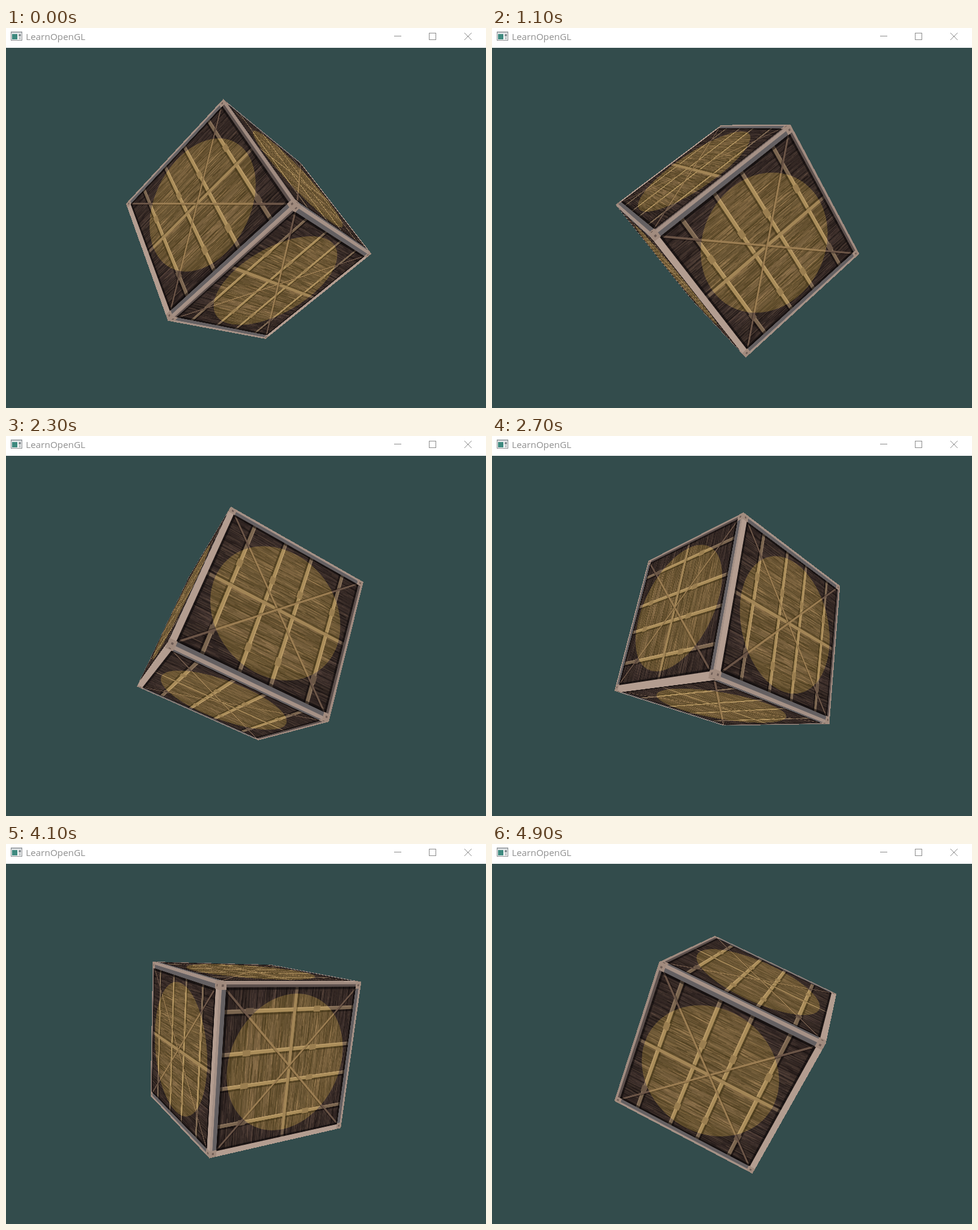
These frames come from a looping animation (799x633 px, 5 s). An HTML page with a canvas:

```html
<!DOCTYPE html>
<html lang="en">
<head>
<meta charset="utf-8">
<title>LearnOpenGL</title>
<style>
  html, body { margin: 0; width: 100%; height: 100%; overflow: hidden; background: #334c4c; }
  #bar { position: absolute; left: 0; top: 0; width: 799px; height: 33px; background: #fff; }
  #bar text { font: 15.3px "Open Sans", "Noto Sans", sans-serif; fill: #8f8f8f; }
  #view { position: absolute; left: 180px; top: 108px; }
</style>
</head>
<body>
<svg id="bar" viewBox="0 0 799 33">
  <rect x="8.5" y="6.5" width="18" height="14" fill="#fff" stroke="#85898c"/>
  <rect x="9" y="7" width="17" height="2" fill="#c9ced2"/>
  <rect x="10" y="10" width="9" height="9" fill="#3f8a80"/>
  <rect x="21" y="10" width="4" height="4" fill="#8a9296"/>
  <rect x="21" y="15" width="4" height="4" fill="#c3c8ca"/>
  <text x="33" y="20">LearnOpenGL</text>
  <g fill="none" stroke="#8c8c8c">
    <path d="M646 13.5h12"/>
    <rect x="704.5" y="8.5" width="11" height="11"/>
    <path d="M763 8l12 12M775 8l-12 12"/>
  </g>
</svg>
<canvas id="view" width="440" height="450"></canvas>
<script>
const LOOP = 5000, STEP = 100;
const START_DEG = -221.25, STEP_DEG = 6.25;
const FOCAL = 300 / Math.tan(Math.PI / 8), EYE = 3;
const LEFT = 180, TOP = 108, CX = 399.5, CY = 333.4;
const SIZE = 512;

function seeded(seed) {
  return () => {
    seed = (seed * 1664525 + 1013904223) >>> 0;
    return seed / 4294967296;
  };
}

// Dark crate side: planks, braces, bars, frame, and a faint yellow disc.
function makeTexture() {
  const cv = document.createElement('canvas');
  cv.width = cv.height = SIZE;
  const g = cv.getContext('2d', { willReadFrequently: true });
  const rnd = seeded(11);
  const box = (x, y, w, h, color) => {
    g.fillStyle = color;
    g.fillRect(x * SIZE, y * SIZE, w * SIZE, h * SIZE);
  };
  const line = (x1, y1, x2, y2, width, color) => {
    g.strokeStyle = color;
    g.lineWidth = width;
    g.beginPath();
    g.moveTo(x1 * SIZE, y1 * SIZE);
    g.lineTo(x2 * SIZE, y2 * SIZE);
    g.stroke();
  };

  box(0, 0, 1, 1, '#211a18');
  const planks = 21;
  for (let i = 0; i < planks; i++) {
    const k = 0.85 + rnd() * 0.35;
    box(i / planks, 0, 1 / planks - 0.004, 1, `rgb(${64 * k},${50 * k},${45 * k})`);
  }
  for (let i = 0; i < 2200; i++) {
    const color = rnd() < 0.48 ? 'rgba(168,136,112,.2)' : 'rgba(10,5,5,.24)';
    box(rnd(), rnd() * 1.1 - 0.1, 0.002 + rnd() * 0.004, 0.03 + rnd() * 0.15, color);
  }
  const shade = g.createRadialGradient(256, 256, 150, 256, 256, 360);
  shade.addColorStop(0, 'rgba(24,17,17,0)');
  shade.addColorStop(1, 'rgba(24,17,17,.55)');
  g.fillStyle = shade;
  g.fillRect(0, 0, SIZE, SIZE);

  for (const y of [0.16, 0.396, 0.59, 0.815]) {
    box(0.03, y + 0.01, 0.94, 0.013, 'rgba(10,6,6,.5)');
    box(0.03, y - 0.012, 0.94, 0.023, '#7a654f');
    box(0.03, y - 0.012, 0.94, 0.006, '#8d765f');
    for (const x of [0.17, 0.64]) box(x, y - 0.018, 0.05, 0.036, '#6a5645');
  }
  box(0.511, 0.03, 0.008, 0.94, 'rgba(10,6,6,.45)');
  box(0.489, 0.03, 0.022, 0.94, '#725d4b');
  for (const [a, b] of [[0.03, 0.97], [0.97, 0.03]]) {
    line(a, 0.035, b, 0.975, 8, 'rgba(15,9,8,.4)');
    line(a, 0.03, b, 0.97, 6, '#6b5547');
  }

  // Frame: dark inner lines, grey posts, then pale outer edges.
  box(0.04, 0, 0.016, 1, 'rgba(8,6,8,.55)');
  box(0.944, 0, 0.016, 1, 'rgba(8,6,8,.55)');
  box(0, 0.03, 1, 0.014, 'rgba(8,6,8,.55)');
  box(0, 0.95, 1, 0.014, 'rgba(8,6,8,.55)');
  box(0.015, 0, 0.026, 1, '#646062');
  box(0.959, 0, 0.026, 1, '#646062');
  box(0, 0.014, 1, 0.016, '#5c504d');
  box(0, 0, 0.016, 1, '#a59186');
  box(0.984, 0, 0.016, 1, '#a59186');
  box(0, 0, 1, 0.015, '#a08b80');
  box(0, 0.964, 1, 0.036, '#b39d90');
  for (const x of [0, 0.957]) {
    for (const y of [0, 0.957]) {
      box(x, y, 0.043, 0.043, '#a18b7e');
      box(x + 0.015, y + 0.015, 0.012, 0.012, '#6d5c55');
    }
  }

  g.globalCompositeOperation = 'lighter';
  g.fillStyle = '#30280b';
  g.beginPath();
  g.arc(SIZE / 2, SIZE * 0.491, SIZE * 0.423, 0, Math.PI * 2);
  g.fill();
  return g.getImageData(0, 0, SIZE, SIZE).data;
}

const tex = makeTexture();
const ctx = document.getElementById('view').getContext('2d');
const { width: W, height: H } = ctx.canvas;
const img = ctx.createImageData(W, H);
const clamp = v => Math.max(0, Math.min(SIZE - 1.001, v));

// Bilinear lookup; v points upwards.
function sample(u, v, out, o) {
  const x = clamp(u * SIZE - 0.5), y = clamp((1 - v) * SIZE - 0.5);
  const xi = x | 0, yi = y | 0, fx = x - xi, fy = y - yi;
  const p = (yi * SIZE + xi) * 4, q = p + SIZE * 4;
  for (let c = 0; c < 3; c++) {
    const a = tex[p + c] + (tex[p + c + 4] - tex[p + c]) * fx;
    const b = tex[q + c] + (tex[q + c + 4] - tex[q + c]) * fx;
    out[o + c] = a + (b - a) * fy;
  }
  out[o + 3] = 255;
}

// Casts one ray per pixel into the unit cube, turned about (0.5, 1, 0).
function drawCube(deg) {
  const t = deg * Math.PI / 180, c = Math.cos(t), s = Math.sin(t), n = 1 - c;
  const kx = 1 / Math.sqrt(5), ky = 2 * kx;
  const toModel = (x, y, z) => [
    x * (c + kx * kx * n) + y * kx * ky * n - z * ky * s,
    x * kx * ky * n + y * (c + ky * ky * n) + z * kx * s,
    x * ky * s - y * kx * s + z * c
  ];
  const eye = toModel(0, 0, EYE);
  img.data.fill(0);
  for (let j = 0; j < H; j++) {
    for (let i = 0; i < W; i++) {
      const d = toModel((LEFT + i + 0.5 - CX) / FOCAL, (CY - TOP - j - 0.5) / FOCAL, -1);
      let near = -Infinity, far = Infinity, axis = 0;
      for (let a = 0; a < 3; a++) {
        const half = d[a] < 0 ? -0.5 : 0.5;
        const enter = (-half - eye[a]) / d[a];
        if (enter > near) { near = enter; axis = a; }
        far = Math.min(far, (half - eye[a]) / d[a]);
      }
      if (near >= far) continue;
      const x = eye[0] + d[0] * near, y = eye[1] + d[1] * near, z = eye[2] + d[2] * near;
      const u = (axis === 0 ? y : x) + 0.5;
      const v = axis === 2 ? y + 0.5 : 0.5 - z;
      sample(u, v, img.data, (j * W + i) * 4);
    }
  }
  ctx.putImageData(img, 0, 0);
}

const begin = performance.now();
let shown = -1;
function tick() {
  const step = Math.floor((performance.now() - begin) % LOOP / STEP);
  if (step !== shown) {
    shown = step;
    drawCube(START_DEG + STEP_DEG * step);
  }
  requestAnimationFrame(tick);
}
tick();
</script>
</body>
</html>
```
